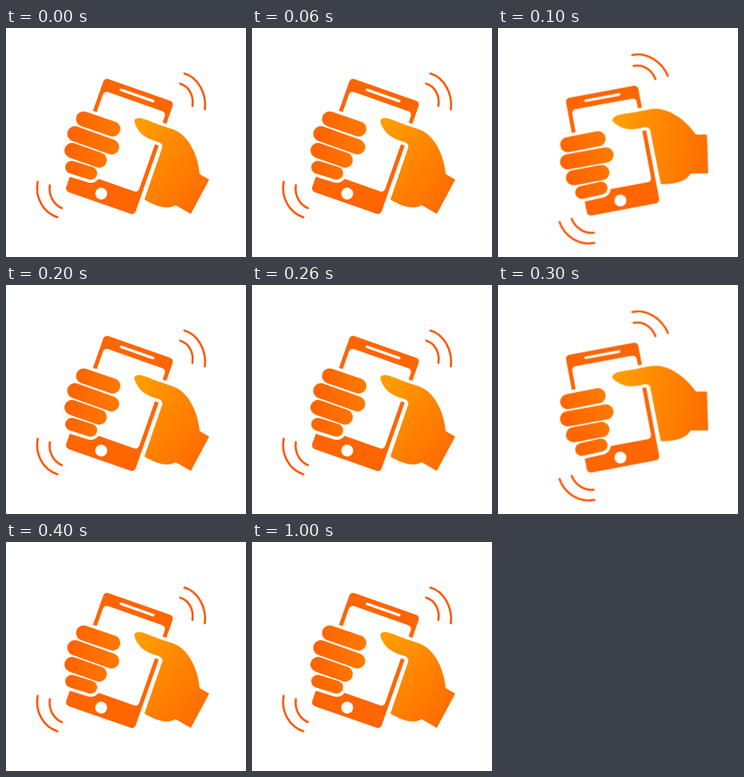
These frames come from a looping animation (300 px wide and 287 px high, 1.4 s). An HTML page:

```html
<!DOCTYPE html>
<html lang="en">
<head>
<meta charset="utf-8">
<title>Shaking phone</title>
<style>
  html, body { margin: 0; width: 100%; height: 100%; overflow: hidden; background: #fff; }
  svg { display: block; width: 100%; height: 100%; }
  .fingers path, .waves path { fill: none; stroke-linecap: round; }
  .waves path { stroke: #ff5500; stroke-width: 2.6; }
  .gap { stroke: #fff; }
</style>
</head>
<body>
<svg viewBox="0 0 300 287">
  <defs>
    <linearGradient id="palm" gradientUnits="userSpaceOnUse" x1="160" y1="125" x2="250" y2="200">
      <stop offset="0" stop-color="#ff9e00"/>
      <stop offset="1" stop-color="#ff6e00"/>
    </linearGradient>
    <linearGradient id="finger" gradientUnits="userSpaceOnUse" x1="74" y1="140" x2="142" y2="150">
      <stop offset="0" stop-color="#ff6200"/>
      <stop offset="1" stop-color="#ff7a00"/>
    </linearGradient>
  </defs>
  <g id="scene">
    <g transform="translate(141.8 148.4) rotate(19.3)">
      <rect x="-46" y="-75" width="92" height="150" rx="5" fill="#ff6500"/>
      <rect x="-41" y="-59.5" width="82" height="106.5" rx="5" fill="#fff"/>
      <path d="M-21.5-67.6H21" stroke="#fff" stroke-width="3.4" stroke-linecap="round"/>
      <circle cx="-2" cy="63.3" r="7.5" fill="#fff"/>
    </g>
    <path class="gap" fill="url(#palm)" stroke-width="8" paint-order="stroke" d="M160.5 117C160 113.5 164 112.5 168 113C178 115 185 119.5 196 122.7L208 126.7C213 128.5 217 131 221 134.5C233 146 240 163 242 183L254 190L231 233L212 222C202 228 188 224 173 215L195.4 149.5Q196 145 191 143C183 141 176 138 171 134C165 129 161 121 160.5 117Z"/>
    <g class="fingers" id="fingers"></g>
    <g class="waves">
      <path d="M223 57C240 62 251 82 248.5 102"/>
      <path d="M217.7 69.7C228.7 73 235 85 233 97.7"/>
      <path d="M39.6 192.8C36 212 46 231 64.3 237.2"/>
      <path d="M54.8 197C53 209 59 221 69.8 225.7"/>
    </g>
  </g>
</svg>
<script>
  const $ = id => document.getElementById(id);

  // Each finger: path of its centre line, thickness
  const fingers = [
    ["M97 114L133.5 126.5", 19],
    ["M86 132.5L132 149", 19],
    ["M82.5 153.5L116.5 165.5", 19],
    ["M82 174.5L106 182", 16]
  ];
  const stroke = (d, width, attrs) => `<path d="${d}" stroke-width="${width}" ${attrs}/>`;
  $("fingers").innerHTML =
    fingers.map(([d, w]) => stroke(d, w + 8, 'class="gap"')).join("") +
    fingers.map(([d, w]) => stroke(d, w, 'stroke="url(#finger)"')).join("");

  const LOOP = 1400;
  const right = "translate(0px, 0px) rotate(0deg)";
  const left = "translate(-53.8px, 96px) rotate(-30deg)";
  const steps = [[0, right], [100, left], [200, right], [300, left], [400, right], [LOOP, right]];

  const frames = steps.map(([time, transform]) => ({ offset: time / LOOP, easing: "step-end", transform }));
  $("scene").animate(frames, { duration: LOOP, iterations: Infinity }).startTime = 0;
</script>
</body>
</html>
```
